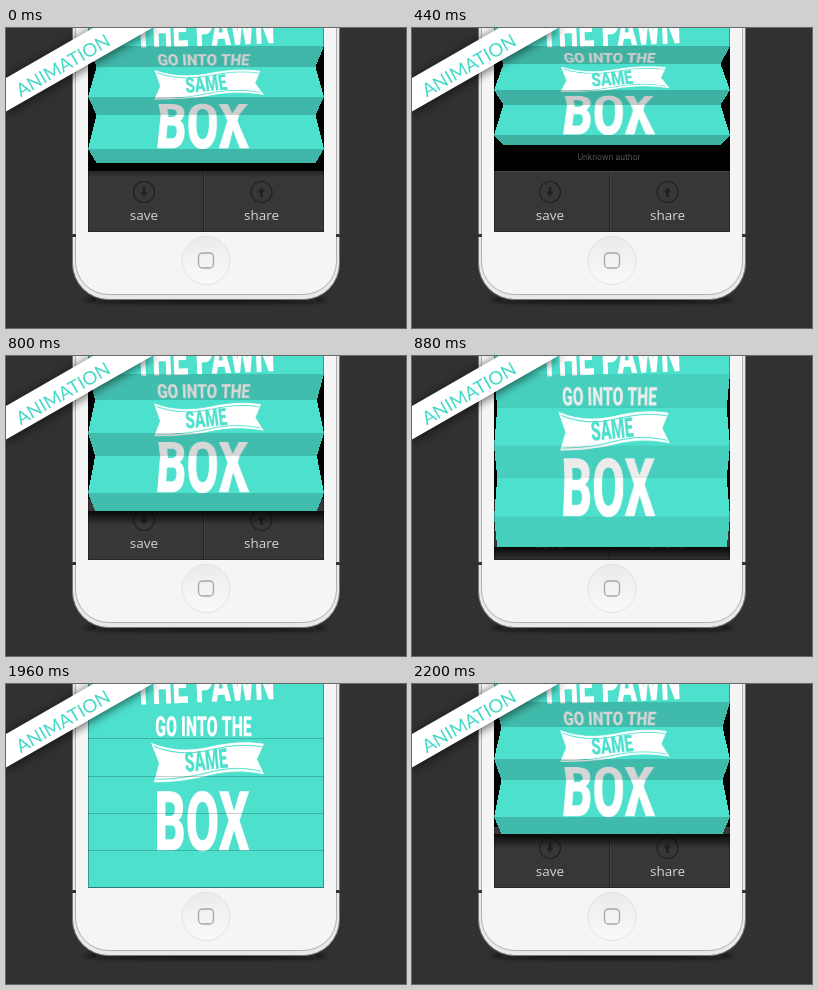
Recreate the animation shown at these times as an HTML page with a canvas. Size 400 by 300 pixels, loop 2.24 s.

```html
<!DOCTYPE html>
<html lang="en">
<head>
<meta charset="utf-8">
<title>Folding paper</title>
<style>
  html, body { margin: 0; width: 100%; height: 100%; overflow: hidden; background: #313131; }
  .stage { position: relative; width: 400px; height: 300px; overflow: hidden; }
  .stage > * { position: absolute; left: 0; top: 0; display: block; }
  #screen { left: 82px; }
  .label { font: 13.5px "Open Sans", sans-serif; fill: #d4d4d4; text-anchor: middle; }
  .credit { font: 8.7px Roboto, sans-serif; fill: #5c5c5c; text-anchor: middle; }
  .tag { font: 18.5px Lato, sans-serif; fill: #45d9c7; text-anchor: middle; }
</style>
</head>
<body>
<div class="stage">
  <svg width="400" height="300">
    <defs>
      <linearGradient id="button" x2="0" y2="1">
        <stop offset="0" stop-color="#ebebeb"/>
        <stop offset="1" stop-color="#fafafa"/>
      </linearGradient>
      <filter id="soft" x="-20%" y="-200%" width="140%" height="500%">
        <feGaussianBlur stdDeviation="2"/>
      </filter>
      <filter id="softer" x="-20%" y="-20%" width="140%" height="140%">
        <feGaussianBlur stdDeviation="4"/>
      </filter>
      <g id="badge" fill="none" stroke="#202020" stroke-width="1.2">
        <circle r="10.5"/>
        <path d="M-1.3-5h2.6v4.800h2.500L0 4.500-3.800-.2h2.500z" fill="#202020" stroke="none"/>
      </g>
    </defs>
    <rect width="400" height="300" fill="#313131"/>
    <ellipse cx="200" cy="272" rx="122" ry="3" fill="#111" filter="url(#soft)"/>
    <rect x="66.5" y="-100" width="267" height="371.5" rx="36" fill="#e9e9e9" stroke="#777"/>
    <rect x="69.500" y="-100" width="261" height="366.5" rx="33" fill="#f5f5f5" stroke="#b0b0b0"/>
    <path d="M66 207.5h4M330 207.5h4" stroke="#333" stroke-width="3"/>
    <circle cx="200" cy="232.5" r="24" fill="url(#button)" stroke="#e3e3e3"/>
    <rect x="192.5" y="225" width="15" height="15" rx="4" fill="none" stroke="#a5a5a5" stroke-width="1.3"/>
    <path d="M82 0h236v204H82z"/>
    <text class="credit" x="197" y="132">Unknown author</text>
    <path d="M82 143h236v61H82z" fill="#373737"/>
    <path d="M82 143.5h236" stroke="#444"/>
    <path d="M197.5 144v60" stroke="#262626"/>
    <path d="M198.5 144v60" stroke="#424242"/>
    <use href="#badge" x="138" y="164"/>
    <use href="#badge" transform="translate(255.500 164) scale(1 -1)"/>
    <text class="label" x="138" y="191.500">save</text>
    <text class="label" x="255.500" y="191.500">share</text>
  </svg>
  <canvas id="screen" width="236" height="204"></canvas>
  <svg width="400" height="300">
    <path d="M82.500 0v203.500h235V0" fill="none" stroke="#000" stroke-opacity=".3"/>
    <path d="M0 87 152 0H87L0 50z" opacity=".5" filter="url(#softer)"/>
    <path d="M0 83.500 146 0H87L0 50z" fill="#fff"/>
    <text class="tag" transform="translate(57 37.500) rotate(-30)" y="6.500">ANIMATION</text>
  </svg>
</div>
<script>
const W = 236, H = 204, LOOP = 2240, STEP = 40;
const TEAL = '#4de0cd';
const HINGE = 18, PANEL = 37.3, PANELS = 5;
const MAX_ANGLE = 53.5;
const ctx = document.getElementById('screen').getContext('2d');

function words(g, text, x, base, size, color = '#fff', turn = 0) {
  g.save();
  g.translate(x, base);
  g.rotate(turn);
  g.scale(0.58, 1);
  g.font = `900 ${size}px Roboto, sans-serif`;
  g.textAlign = 'center';
  g.fillStyle = color;
  g.fillText(text, 0, 0);
  g.restore();
}

function drawPaper(g) {
  g.fillStyle = TEAL;
  g.fillRect(0, 0, W, 206);
  g.save();
  g.translate(-82, 0);
  words(g, 'THE PAWN', 199, 18, 49, '#fff', -0.042);
  words(g, 'GO INTO THE', 197.5, 52.5, 27.5);
  words(g, 'BOX', 196, 166.5, 83.5);
  g.fillStyle = '#fff';
  g.fill(new Path2D('M145 59Q172 70 203 63T258 60L251 75 258 90Q230 84 203 91T148 98L153 79z'));
  g.strokeStyle = TEAL;
  g.lineWidth = 1;
  g.stroke(new Path2D('M148 62.500Q174 73 204 66T256 63M150 95Q176 95 203 88T255 87'));
  words(g, 'SAME', 201, 85.5, 27, TEAL, -0.1);
  g.restore();
}

const sheet = document.createElement('canvas');
const RES = 2;
sheet.width = W * RES;
sheet.height = 206 * RES;
const sheetCtx = sheet.getContext('2d');
sheetCtx.scale(RES, RES);

// cubic ease in and out
function ease(x) {
  x = Math.min(1, Math.max(0, x));
  return x < 0.5 ? 4 * x ** 3 : 1 - 4 * (1 - x) ** 3;
}

// tilt of the panels in degrees
function angleAt(t) {
  const closed = t < 580 || t >= 1200
    ? ease(((t + LOOP - 1900) % LOOP) / 500) * (t >= 1200 && t < 1900 ? 0 : 1)
    : 1 - ease((t - 580) / 520);
  return MAX_ANGLE * closed;
}

function drawFolded(angle) {
  const rad = angle * Math.PI / 180;
  const tilt = Math.sin(rad), depth = 0.1 * tilt;
  const edges = [];
  for (let i = 0; i <= PANELS; i++) {
    const y = HINGE + i * PANEL * Math.cos(rad);
    const back = i % 2 ? depth : 0;
    edges.push({ y: Math.round(y - back * (y + 15)), inset: back * W / 2 });
  }
  const end = edges[PANELS];

  const shade = ctx.createLinearGradient(0, end.y, 0, end.y + 14);
  shade.addColorStop(0, 'rgba(0,0,0,.85)');
  shade.addColorStop(1, 'rgba(0,0,0,0)');
  ctx.fillStyle = shade;
  ctx.fillRect(0, end.y, W, 14);

  for (let i = 0; i < PANELS; i++) {
    const a = edges[i], b = edges[i + 1];
    const rows = b.y - a.y, rate = PANEL / rows;
    for (let r = 0; r < rows; r++) {
      const inset = a.inset + (b.inset - a.inset) * (r + 0.5) / rows;
      ctx.drawImage(sheet, 0, (HINGE + i * PANEL + r * rate) * RES, W * RES, rate * RES,
        inset, a.y + r, W - 2 * inset, 1);
    }
    if (i % 2 === 0) {
      ctx.fillStyle = `rgba(0,0,0,${0.26 * tilt})`;
      ctx.beginPath();
      ctx.moveTo(a.inset, a.y);
      ctx.lineTo(W - a.inset, a.y);
      ctx.lineTo(W - b.inset, b.y);
      ctx.lineTo(b.inset, b.y);
      ctx.fill();
    }
  }

  // creases show before the panels visibly tilt
  ctx.fillStyle = `rgba(0,0,0,${0.2 * Math.max(0, 1 - tilt * 3)})`;
  for (const e of edges.slice(1)) ctx.fillRect(e.inset, e.y - 1, W - 2 * e.inset, 1);
}

function render(now) {
  const t = Math.floor((now % LOOP) / STEP) * STEP;
  const angle = angleAt(t);
  ctx.clearRect(0, 0, W, H);
  ctx.save();
  if (angle > 0.1) {
    drawFolded(angle);
    ctx.beginPath();
    ctx.rect(0, 0, W, HINGE);
    ctx.clip();
  }
  drawPaper(ctx);
  ctx.restore();
}

ctx.imageSmoothingQuality = 'high';
drawPaper(sheetCtx);
const start = performance.now();
function tick() {
  render(performance.now() - start);
  requestAnimationFrame(tick);
}
tick();
</script>
</body>
</html>
```
